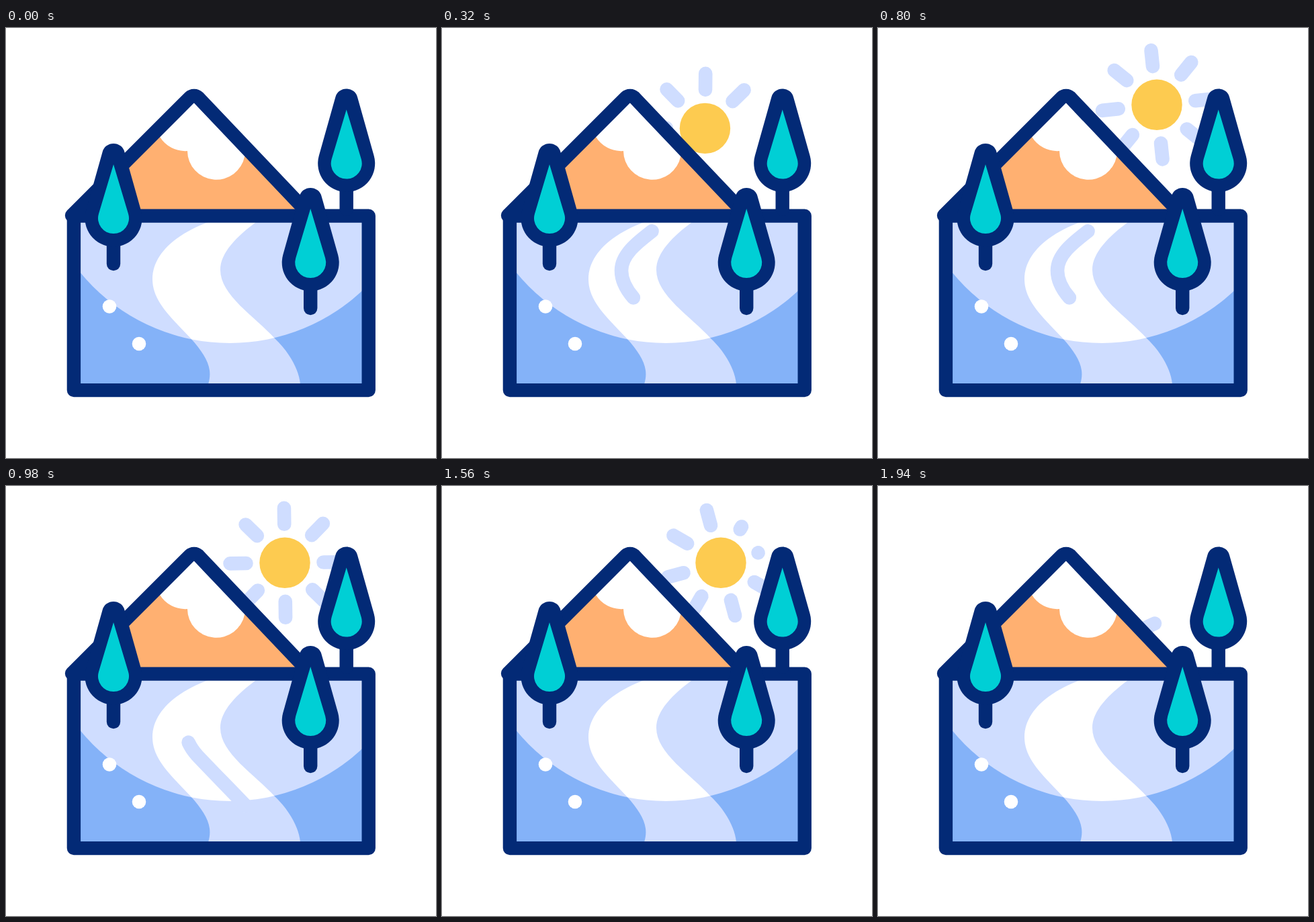
Animation of 640 by 640 pixels, one loop 1.96 s. Source, as an HTML page:

```html
<!DOCTYPE html>
<html lang="en">
<head>
<meta charset="utf-8">
<title>Mountain sunrise</title>
<style>
  html, body { margin: 0; width: 100%; height: 100%; overflow: hidden; background: #fff; }
  svg { display: block; width: 100%; height: 100%; }
  .navy { fill: #032a76; }
  .edge { fill: none; stroke: #032a76; stroke-width: 20.4; stroke-linecap: round; stroke-linejoin: round; }
  .pale { fill: #cfddff; }
  .line { fill: none; stroke: #cfddff; stroke-width: 20.6; stroke-linecap: round; }
  .snow { fill: #fff; }
</style>
</head>
<body>
<svg viewBox="0 0 640 640">
  <defs>
    <clipPath id="hill"><circle cx="333" cy="181" r="288"/></clipPath>
    <clipPath id="field"><rect x="101" y="279" width="438" height="260"/></clipPath>
    <path id="road" d="M301 289C262 303 218 332 218 374C218 408 249 434 276 463C296 486 309 505 301 530H438C436 510 424 485 400 462C370 429 319 398 319 360C319 334 344 310 372 289Z"/>
    <g id="tree">
      <path class="edge" d="M0 30V68"/>
      <path class="navy" d="M-16.4 -98.6A17 17 0 0 1 16.4 -98.6L40.9 -11.5A42.5 42.5 0 1 1 -40.9 -11.5Z"/>
      <path fill="#00cfd5" d="M0 -80L22 -6.6A23 23 0 1 1 -22 -6.6Z"/>
    </g>
  </defs>

  <g id="sun">
    <circle r="37.7" fill="#fdcb50"/>
    <g id="rays"></g>
  </g>

  <path fill="#ffb071" d="M280 100L101 279H449Z"/>
  <path class="snow" d="M280 100L217 161L229 162A44 44 0 0 0 270 183A43 43 0 0 0 355.2 191L367 191Z"/>
  <path class="edge" d="M98 279L273.6 103.4A9 9 0 0 1 286.2 103.5L453 279"/>

  <g clip-path="url(#field)">
    <rect x="101" y="279" width="438" height="260" fill="#84b2f8"/>
    <circle class="pale" cx="333" cy="181" r="288"/>
    <use href="#road" class="pale"/>
    <use href="#road" class="snow" clip-path="url(#hill)"/>
    <g id="streams"></g>
    <circle class="snow" cx="154" cy="414.5" r="10.3"/>
    <circle class="snow" cx="198" cy="470" r="10.3"/>
  </g>
  <rect class="edge" x="100.9" y="279.6" width="438.8" height="259.5"/>

  <use href="#tree" x="160" y="283"/>
  <use href="#tree" x="453.2" y="349"/>
  <use href="#tree" x="506.7" y="201.5"/>
</svg>
<script>
const LOOP = 1960;
const REST = [415, 114.3], RISE = [332, 238], SET = [337, 242];
const RAY_IN = 57.5, RAY_LEN = 24;

const $ = id => document.getElementById(id);
const clamp = v => Math.min(1, Math.max(0, v));
const smooth = v => v * v * (3 - 2 * v);
const easeOut = (v, power) => 1 - (1 - v) ** power;
const span = (t, start, length) => clamp((t - start) / length);

function add(parent, tag, attrs) {
  const el = document.createElementNS('http://www.w3.org/2000/svg', tag);
  for (const key in attrs) el.setAttribute(key, attrs[key]);
  return parent.appendChild(el);
}

const rays = Array.from({ length: 8 }, (_, k) =>
  add($('rays'), 'line', { class: 'line', transform: `rotate(${k * 45})`, y1: -RAY_IN }));

// Two passes of the same ripple, each with its start time.
const ripples = [38, 518].map(start => ({
  start,
  el: add($('streams'), 'path', {
    class: 'line',
    d: 'M348 277L337 285C330 290 322 295 313 302C291 319 267 337 267 361C267 377 275 390 284.5 401C308 426 337 455 372 492'
  })
}));

function sunPlace(t) {
  const rising = t < 1000;
  const away = rising ? 1 - smooth(span(t, 0, 495)) : smooth(span(t, 1565, 425));
  const far = rising ? RISE : SET;
  return REST.map((v, i) => v + (far[i] - v) * away);
}

function sunTurn(t) {
  return t < 1200 ? -90 * (1 - span(t, 0, 1080)) ** 2 : -90 * span(t, 1380, 680) ** 1.35;
}

// Rays grow, and later shrink, one after another anticlockwise.
function drawRay(el, k, t) {
  const turn = (10 - k) % 8;
  const grow = easeOut(span(t, 45 + 70 * turn, 150), 2);
  const shrink = easeOut(span(t, 1410 + 75 * turn, 180), 3);
  const size = grow - shrink;
  el.setAttribute('y2', -RAY_IN - RAY_LEN * size);
  el.style.display = size > 0 ? '' : 'none';
}

// The head runs slightly faster than the tail.
function drawRipple({ el, start }, t) {
  const age = t - start;
  const head = age * 0.585;
  const tail = Math.max(0, (age - 203) * 0.545);
  el.style.display = head > 0 && tail < 285 ? '' : 'none';
  el.setAttribute('stroke-dasharray', `${Math.max(0, head - tail)} 2000`);
  el.setAttribute('stroke-dashoffset', -tail);
}

function draw(t) {
  $('sun').setAttribute('transform', `translate(${sunPlace(t)})`);
  $('rays').setAttribute('transform', `rotate(${sunTurn(t)})`);
  rays.forEach((el, k) => drawRay(el, k, t));
  ripples.forEach(r => drawRipple(r, t));
}

const begin = performance.now();
function tick() {
  draw((performance.now() - begin) % LOOP);
  requestAnimationFrame(tick);
}
draw(0);
requestAnimationFrame(tick);
</script>
</body>
</html>
```
